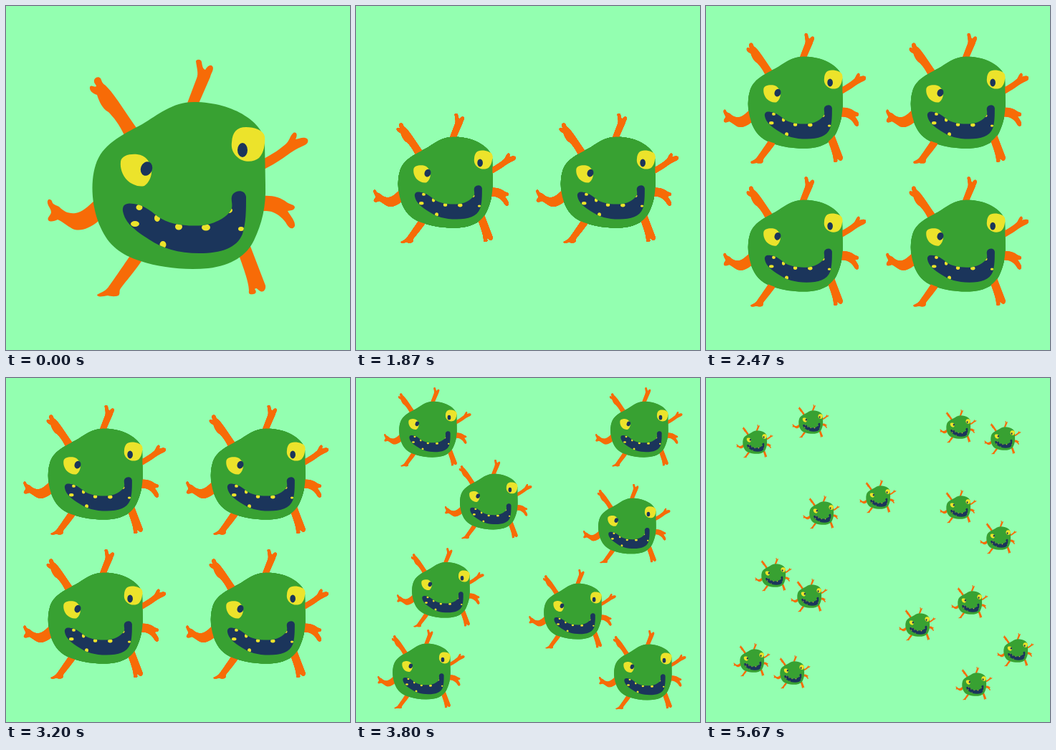
Animation, 480 px wide and 480 px high, one loop 6270 ms. Source, as an HTML page with a canvas:

```html
<!DOCTYPE html>
<html lang="en">
<head>
<meta charset="utf-8">
<title>Germs</title>
<style>
  html, body { margin: 0; width: 100%; height: 100%; overflow: hidden; background: #93ffb0; }
  canvas { display: block; width: 480px; height: 480px; }
</style>
</head>
<body>
<canvas id="stage" width="480" height="480"></canvas>
<script>
const LOOP = 6270, FPS = 15;
const MINT = '#93ffb0', GREEN = '#38a132', ORANGE = '#f76b07', YELLOW = '#ece32b', NAVY = '#1b355b';
const ctx = document.getElementById('stage').getContext('2d');

// Germ artwork, centred on (240, 239.5) at scale 1
const legs = [
  'M265,77C266,74 272,74 273,78C274,85 275,88 278,89C281,84 285,81 288,84C291,88 286,94 285,99L268,138L252,138L266,101C269,94 266,86 265,77Z',
  'M123,106C122,101 128,97 132,101C134,105 134,108 139,111C147,119 151,125 156,132C163,142 172,156 182,170L166,182C158,165 150,155 143,148C134,143 130,133 127,124C121,122 116,118 117,113C119,109 123,114 126,112C126,110 123,108 123,106Z',
  'M358,214C372,207 383,199 390,193C396,188 396,181 401,177C406,175 407,181 404,186C409,185 415,182 420,185C423,188 421,193 415,195C405,199 395,206 387,212C378,218 368,224 358,229Z',
  'M358,265C372,264 383,267 392,274C396,277 403,277 403,281C402,286 396,285 393,286C397,293 404,300 403,307C400,313 395,310 392,305C388,297 380,291 373,288C368,286 364,286 356,286Z',
  'M339,330L362,390C363,396 359,400 355,398C351,396 350,392 347,395C350,398 349,402 345,402C341,403 338,402 339,397C339,385 330,362 324,345Z',
  'M174,347C160,368 148,385 143,392C138,399 131,400 127,403C128,407 135,405 142,404C146,405 152,406 157,404C160,401 157,398 160,394C168,383 180,370 191,353Z',
  'M124,271C114,280 106,288 97,289C87,290 81,287 74,280C68,277 65,277 64,272C61,268 57,270 58,275C59,280 63,283 63,288C62,293 57,295 59,299C62,302 68,300 72,298C78,300 84,306 93,311C103,315 116,311 129,300Z'
].map(d => new Path2D(d));
const body = new Path2D('M262,134C232,134 212,152 190,165C160,181 134,193 125,222C117,247 120,283 132,309C143,334 160,347 188,356C215,365 250,369 282,366C315,362 336,348 346,327C357,304 363,280 362,250L361,190C360,165 320,134 262,134Z');
const eyes = new Path2D('M160,217C161,209 172,206 183,207C195,208 201,217 203,228C204,238 199,247 193,251C185,253 175,249 169,243C162,236 159,226 160,217Z' +
  'M315,190C316,176 322,169 335,169C347,169 359,173 361,182C362,192 360,205 353,212C345,219 330,218 323,211C316,205 314,198 315,190Z');
const mouth = new Path2D('M163,286C162,277 168,274 178,276C190,277 200,284 212,294C228,305 252,308 276,306C295,303 312,292 315,282C317,275 312,268 317,262C322,257 333,256 335,266C335,285 335,302 330,318C322,338 300,345 270,345C240,345 218,338 200,326C180,313 166,303 163,286Z');
const blobs = list => {
  const path = new Path2D();
  for (const [x, y, rx, ry, turn = 0] of list) {
    const oval = new Path2D();
    oval.ellipse(x, y, rx, ry, turn, 0, 7);
    path.addPath(oval);
  }
  return path;
};
const pupils = blobs([[196, 227, 8, 10, 0.35], [330, 201, 7, 10]]);
const teeth = blobs([[186, 281, 4.5, 4], [211, 296, 4, 5], [241, 308, 5, 4.5], [279, 309, 6, 4.5],
  [311, 285, 5, 4], [180, 304, 6, 4], [219, 333, 4.5, 5], [328, 311, 4, 3]]);

function drawGerm({ x, y, s }) {
  const fill = (color, path) => { ctx.fillStyle = color; ctx.fill(path); };
  ctx.save();
  ctx.translate(x, y);
  ctx.scale(s, s);
  ctx.translate(-240, -239.5);
  legs.forEach(leg => fill(ORANGE, leg));
  fill(GREEN, body);
  fill(YELLOW, eyes);
  fill(NAVY, pupils);
  fill(NAVY, mouth);
  ctx.clip(mouth);
  fill(YELLOW, teeth);
  ctx.restore();
}

// Each split: start time, quick and slow settling times
const SLOW = 90;
const splits = [[844, 19], [2052, 22], [3260, 36], [4467, SLOW]];
const sizes = [1.006, 0.546, 0.333, 0.14];

// Back to front: column, row, cluster, lower and upper germ, quick flags for the first two splits
const clusters = [
  [351, 128, [395, 68], [414, 83], [352, 67], 0, 0],
  [351, 329, [400, 407], [374, 426], [432, 379], 0, 1],
  [124, 128, [100, 68], [68, 88], [146, 60], 0, 0],
  [124, 329, [91, 406], [64, 393], [120, 410], 0, 1],
  [124, 128, [185, 169], [161, 187], [240, 165], 1, 1],
  [124, 329, [118, 292], [144, 303], [94, 274], 1, 0],
  [351, 128, [378, 203], [352, 179], [408, 222], 1, 1],
  [351, 329, [302, 322], [295, 343], [368, 312], 1, 0]
];
const germs = clusters.flatMap(([col, row, spot, low, high, q1, q2]) =>
  [low, high].map((end, top) => ({
    stops: [[240, 239.5], [col, 240], [col, row], spot, end],
    quick: [q1, q2, !q1 && top, 0]
  })));

const settle = (t, tau) => t <= 0 ? 0 : 1 - Math.exp(-t / tau);

function poseAt(t, { stops, quick }) {
  let [x, y] = stops[0];
  let s = sizes[0] - 0.006 * Math.exp(-t / 150);
  splits.forEach(([start, fast], i) => {
    const p = settle(t - start, quick[i] ? fast : SLOW);
    x += p * (stops[i + 1][0] - stops[i][0]);
    y += p * (stops[i + 1][1] - stops[i][1]);
    // The second split keeps the size
    const from = sizes[i < 2 ? i : i - 1], to = sizes[i < 1 ? 1 : i];
    s += p * (to - from);
  });
  return { x, y, s };
}

function render(now) {
  const t = Math.floor(((now % LOOP) + 4) * FPS / 1000) * 1000 / FPS;
  ctx.fillStyle = MINT;
  ctx.fillRect(0, 0, 480, 480);
  const poses = germs.map(germ => poseAt(t, germ));
  // Before the first split all germs coincide
  (t < splits[0][0] ? poses.slice(0, 1) : poses).forEach(drawGerm);
}

const begin = performance.now();
function tick() {
  render(performance.now() - begin);
  requestAnimationFrame(tick);
}
tick();
</script>
</body>
</html>
```
